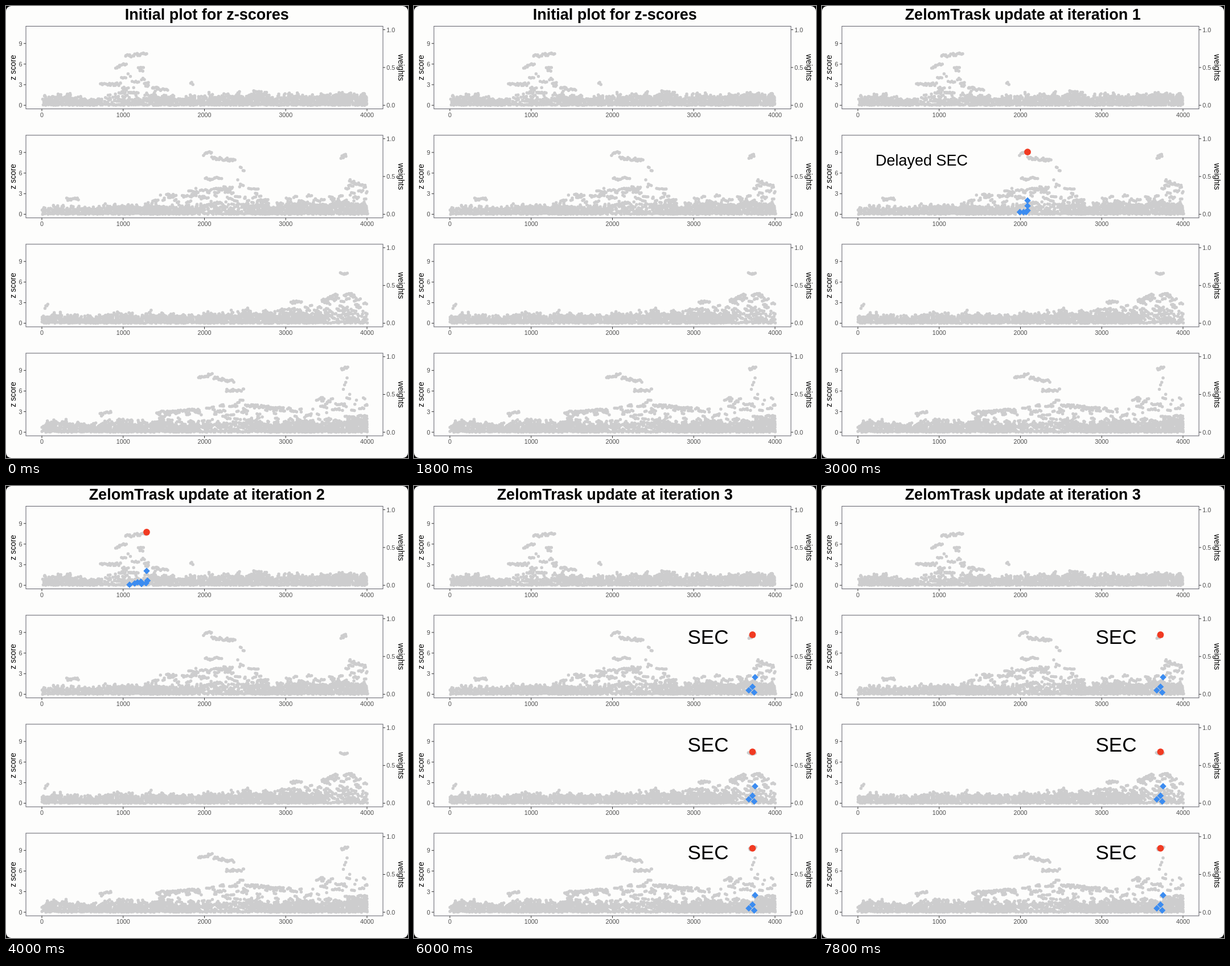
Write an HTML page that moves like this. It is 706 px wide and 793 px high and loops after 8000 ms.

```html
<!DOCTYPE html>
<html lang="en">
<head>
<meta charset="utf-8">
<title>Score plots</title>
<style>
html, body { margin: 0; width: 100%; height: 100%; overflow: hidden; background: #000; }
svg { display: block; font-family: "Liberation Sans", Arial, sans-serif; }
.title { font-size: 27px; font-weight: bold; text-anchor: middle; }
.tick { font-size: 10.8px; fill: #4d4d4d; }
.axis { font-size: 13.8px; text-anchor: middle; }
.frame { fill: none; stroke: #60606a; }
.marks { fill: none; stroke: #333; }
.dots { fill: none; stroke: #cdcdce; stroke-width: 5.5; stroke-linecap: round; }
.peak { fill: #f13a22; }
.weight { fill: #3c8cf0; }
.scene { visibility: hidden; animation: show 8s step-end infinite; }
@keyframes show {
  0% { visibility: visible; }
  25%, 100% { visibility: hidden; }
}
</style>
</head>
<body>
<svg id="stage" width="706" height="793" viewBox="0 0 706 793"></svg>
<script>
const STEP = 191.2, BASE = 174.2, LEFT = 63, RIGHT = 634;

const rnd = (seed => () => {
  seed = (seed * 1664525 + 1013904223) >>> 0;
  return seed / 4294967296;
})(2024);
const mix = (a, b, t) => a + (b - a) * t;
const dot = (x, h) => `M${x.toFixed(1)} ${(BASE - h).toFixed(1)}h0`;
const repeat = (count, draw) => Array.from({ length: Math.round(count) }, (_, i) => draw(i)).join("");

// Ragged band along the zero line, thinned out between two positions.
function floor(left, right, thinFrom = 0, thinTo = 0) {
  const block = 4;
  return repeat((RIGHT - LEFT) / block, i => {
    const x = LEFT + i * block;
    const wave = 1 + .1 * Math.sin(x / 13) + .08 * Math.sin(x / 29);
    const top = mix(left, right, (x - LEFT) / (RIGHT - LEFT)) * wave * (.72 + .45 * rnd() ** 2);
    const count = top * block * (x > thinFrom && x < thinTo ? .055 : .12);
    return dot(x + rnd() * block, rnd() * 2) +
      repeat(count, k => dot(Math.min(RIGHT, x + rnd() * block), top * (k + rnd()) / count));
  });
}

// Loose short runs of dots under a sloping ceiling.
function cloud(from, to, topLeft, topRight) {
  const runs = (to - from) * (topLeft + topRight) / 2 * .01;
  return repeat(runs, i => {
    const t = (i + rnd()) / runs;
    const x = mix(from, to, t), h = mix(topLeft, topRight, t) * rnd();
    return repeat(1 + rnd() * 3, k => dot(Math.min(to, x + k * 2.5), h + rnd() * 3));
  });
}

// Narrow row of dots between two points.
function streak(x1, h1, x2, h2) {
  const count = Math.max(2, (x2 - x1) / 1.8);
  return repeat(count, i => {
    const t = (i + rnd()) / count;
    return dot(mix(x1, x2, t), mix(h1, h2, t) + (rnd() - .5) * 5);
  });
}

const panels = [
  floor(17, 23, 165, 250) +
    cloud(196, 250, 45, 74) +
    streak(165, 37, 203, 37) + streak(192, 66, 211, 74) + streak(209, 86, 249, 91) +
    streak(256, 32, 284, 25) + streak(324, 38, 329, 38),
  floor(14, 24, 340, 425) +
    cloud(255, 340, 32, 48) + cloud(340, 420, 42, 64) + cloud(420, 460, 52, 32) +
    cloud(490, 585, 28, 42) + cloud(585, 634, 56, 44) +
    streak(105, 26, 128, 26) + streak(346, 105, 362, 109) + streak(361, 99, 402, 95) +
    streak(350, 62, 378, 63) + streak(365, 43, 400, 46) + streak(411, 84, 418, 76) +
    streak(588, 100, 599, 104) + streak(602, 60, 632, 48),
  floor(16, 22, 560, RIGHT) +
    cloud(450, 555, 20, 34) + cloud(555, 634, 48, 46) +
    streak(67, 26, 74, 32) + streak(500, 37, 520, 38) + streak(555, 40, 582, 51) +
    streak(587, 87, 600, 87) + streak(595, 51, 612, 52),
  floor(19, 23, 335, 425) +
    cloud(262, 340, 34, 40) + cloud(340, 425, 38, 58) + cloud(425, 545, 44, 40) +
    cloud(545, 634, 60, 70) +
    streak(164, 30, 186, 36) + streak(264, 35, 340, 39) + streak(337, 96, 362, 101) +
    streak(365, 96, 401, 89) + streak(386, 73, 418, 74) + streak(420, 48, 480, 41) +
    streak(588, 111, 600, 113) + streak(592, 74, 600, 100)
];

const sharedWeights = [[599, 144.3], [594.5, 161], [588, 167.3], [597.5, 171]];
const scenes = [
  { title: "Initial plot for z-scores", marks: [] },
  { title: "ZelomTrask update at iteration 1",
    marks: [{ panel: 1, peak: [361, 65], label: ["Delayed SEC", 94, 89, 27],
      weights: [[361, 150], [361, 159.5], [361, 167.5], [347.5, 170.4], [354, 170.4], [358.5, 170.4]] }] },
  { title: "ZelomTrask update at iteration 2",
    marks: [{ panel: 0, peak: [247, 81],
      weights: [[247, 149], [217, 173.3], [226, 171], [231, 169], [237, 168], [238, 172],
        [248.5, 166], [246, 170.5]] }] },
  { title: "ZelomTrask update at iteration 3",
    marks: [[1, 69.8, 86], [2, 83.9, 83.7], [3, 62, 81.9]].map(([panel, y, baseline]) =>
      ({ panel, peak: [594.5, y], label: ["SEC", 480.5, baseline, 35], weights: sharedWeights })) }
];

const text = (cls, x, y, content, extra = "") =>
  `<text class="${cls}" x="${x}" y="${y}" ${extra}>${content}</text>`;
const place = (panel, content) => `<g transform="translate(0 ${panel * STEP})">${content}</g>`;

function plot(dots, panel) {
  let ticks = "", labels = "";
  for (const z of [0, 3, 6, 9]) {
    const y = BASE - z * 12.05;
    ticks += `M31 ${y}h4`;
    labels += text("tick", 28.5, y + 3.9, z, 'text-anchor="end"');
  }
  for (const w of [0, .5, 1]) {
    const y = BASE - w * 132.6;
    ticks += `M662 ${y}h4`;
    labels += text("tick", 668.3, y + 3.9, w.toFixed(1));
  }
  for (let n = 0; n <= 4000; n += 1000) {
    const x = mix(LEFT, RIGHT, n / 4000);
    ticks += `M${x} 180.5v4`;
    labels += text("tick", x, 194.5, n, 'text-anchor="middle"');
  }
  return place(panel,
    `<path class="dots" d="${dots}"/>
     <rect class="frame" x="35" y="35.5" width="627" height="145"/>
     <path class="marks" d="${ticks}"/>${labels}` +
    text("axis", 0, 0, "z score", 'transform="translate(17.3 108) rotate(-90)"') +
    text("axis", 0, 0, "weights", 'transform="translate(688.5 108) rotate(90)"'));
}

function highlight({ panel, peak, label, weights }) {
  const diamonds = weights.map(([x, y]) => `M${x} ${y - 5.8}l5.8 5.8-5.8 5.8-5.8-5.8z`).join("");
  const caption = label ? text("", label[1], label[2], label[0], `font-size="${label[3]}"`) : "";
  return place(panel,
    `<circle class="peak" cx="${peak[0]}" cy="${peak[1]}" r="5.9"/>
     <path class="weight" d="${diamonds}"/>${caption}`);
}

document.getElementById("stage").innerHTML =
  '<rect width="706" height="793" rx="9" fill="#fdfdfc"/>' +
  panels.map(plot).join("") +
  scenes.map(({ title, marks }, i) =>
    `<g class="scene" style="animation-delay:${i ? i * 2 - 8 : 0}s">` +
    text("title", 352.7, 24.3, title) + marks.map(highlight).join("") + "</g>").join("");
</script>
</body>
</html>
```
